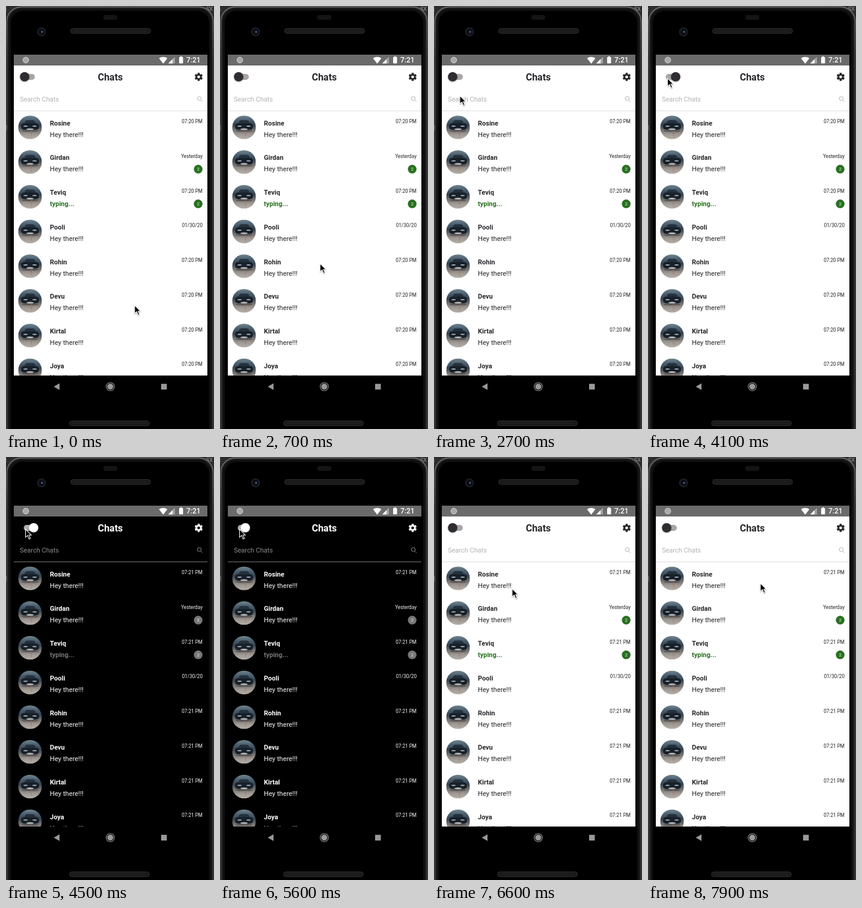
Write an HTML page with a canvas that moves like this. It is 346 by 704 pixels and loops after 8 s.

```html
<!DOCTYPE html>
<html lang="en">
<head>
<meta charset="utf-8">
<title>Chats</title>
<style>
  html, body { margin: 0; width: 100%; height: 100%; overflow: hidden; background: #000; }
  canvas { display: block; width: 346px; height: 704px; }
</style>
</head>
<body>
<canvas id="stage" width="346" height="704"></canvas>
<script>
const ctx = document.getElementById('stage').getContext('2d');
const WIDTH = 346, HEIGHT = 704, LOOP = 8000, STEP = 100;
const SCREEN = { x: 13, y: 81, w: 322, h: 534 };
const MID = 173.5, ROW = 57.75;
const DARK_FROM = 4500, DARK_TO = 6600;

const LIGHT = { bg: '#fff', text: '#242426', strong: '#29262b', hint: '#b2b2b2', line: '#dedede',
                accent: '#28701f', knob: '#302d32', track: '#aaa6a8' };
const DARK = { bg: '#000', text: '#f4f4f4', strong: '#fff', hint: '#8c8c8c', line: '#777',
               accent: '#777', knob: '#fff', track: '#b4aeae' };

const CHATS = [
  { name: 'Rosine' },
  { name: 'Girdan', when: 'Yesterday', unread: 2 },
  { name: 'Teviq', typing: true, unread: 2 },
  { name: 'Pooli', when: '01/30/20' },
  { name: 'Rohin' },
  { name: 'Devu' },
  { name: 'Kirtal' },
  { name: 'Joya' }
];

const clamp = v => Math.min(1, Math.max(0, v));
const smooth = v => v * v * (3 - 2 * v);
const mix = (a, b, p) => a + (b - a) * p;
const progress = (t, from, to) => clamp((t - from) / (to - from));

// Each glide pulls the pointer from wherever it is to a new place.
function pointerAt(t) {
  const pos = { x: 213, y: 497 };
  const glide = (from, to, x, y, ease = p => p) => {
    const p = ease(progress(t, from, to));
    pos.x = mix(pos.x, x, p);
    pos.y = mix(pos.y, y, p);
  };
  glide(0, 1400, 118, 358);
  glide(1400, 3400, 31.5, 119, p => 1 - (1 - p) ** 2);
  glide(5800, 6600, 129, 218, p => 1 - (1 - p) ** 1.4);
  glide(6600, 7900, 186, 209, smooth);
  return pos;
}

const switchAt = t => smooth(progress(t, 3800, 4100)) - smooth(progress(t, 5500, 5800));

function paint(fill, stroke, width = 1) {
  if (fill) { ctx.fillStyle = fill; ctx.fill(); }
  if (stroke) { ctx.strokeStyle = stroke; ctx.lineWidth = width; ctx.stroke(); }
}

function disc(x, y, r, fill, stroke, width) {
  ctx.beginPath();
  ctx.arc(x, y, r, 0, Math.PI * 2);
  paint(fill, stroke, width);
}

function oval(x, y, rx, ry, fill) {
  ctx.beginPath();
  ctx.ellipse(x, y, rx, ry, 0, 0, Math.PI * 2);
  paint(fill);
}

function rect(x, y, w, h, fill) {
  ctx.fillStyle = fill;
  ctx.fillRect(x, y, w, h);
}

function pill(x, y, w, h, r, fill, stroke, width) {
  ctx.beginPath();
  ctx.roundRect(x, y, w, h, r);
  paint(fill, stroke, width);
}

function triangle(x1, y1, x2, y2, x3, y3, fill) {
  ctx.beginPath();
  ctx.moveTo(x1, y1);
  ctx.lineTo(x2, y2);
  ctx.lineTo(x3, y3);
  paint(fill);
}

function text(str, x, y, size, color, weight = 400, align = 'left') {
  ctx.font = `${weight} ${size}px Roboto, sans-serif`;
  ctx.textAlign = align;
  ctx.fillStyle = color;
  ctx.fillText(str, x, y);
}

// Evenly spaced vertical gradient
function fade(top, bottom, ...colors) {
  const g = ctx.createLinearGradient(0, top, 0, bottom);
  colors.forEach((color, i) => g.addColorStop(i / (colors.length - 1), color));
  return g;
}

function drawPhone() {
  rect(0, 0, WIDTH, HEIGHT, '#2c2c2c');
  text('x', -3, 8, 9, '#999');
  text('SX', 333, 8, 9, '#999');
  const shell = (inset, radius, fill, stroke, width) =>
    pill(inset, inset, WIDTH - 2 * inset, HEIGHT + 40, radius, fill, stroke, width);
  shell(1.5, 24, '#1a1a1a', fade(0, 90, '#686868', '#3c3c3c'), 2);
  shell(4, 22, '#101010', '#242424', 1);
  shell(8, 20, '#000');
  rect(0, 198, 2, 9, '#555');
  pill(MID - 11.5, 15, 23, 8, 3, '#141416');
  for (const [x, y] of [[MID, 37.5], [MID - 2, 690.5]]) {
    pill(x - 66, y, 133, 8, 4, '#191919', '#303030');
    rect(x - 61, y + 3.5, 123, 1, '#252525');
  }
  disc(59, 43, 7.5, '#1a1c20');
  disc(59, 43, 5, '#0a0d14');
  disc(60, 43, 1.5, '#55729c');
}

function drawStatusBar() {
  rect(SCREEN.x, SCREEN.y, SCREEN.w, 18, '#6b6b6b');
  disc(33, 90, 4.8, '#a9a9a9', '#d8d8d8');
  ctx.beginPath();
  ctx.moveTo(261.5, 96);
  ctx.arc(261.5, 96, 11.3, -Math.PI * .71, -Math.PI * .29);
  paint('#fff');
  triangle(270, 95.5, 281, 95.5, 281, 84.5, '#a5a5a5');
  triangle(270, 95.5, 277, 95.5, 277, 88.5, '#fff');
  pill(288, 85, 6.5, 10.5, 1, '#fff');
  rect(289.7, 83.8, 3, 2, '#fff');
  text('7:21', 300, 94.3, 12, '#fff', 500);
}

function drawNav(y, color) {
  triangle(79.5, y, 89, y - 5.5, 89, y + 5.5, color);
  disc(MID, y, 5, color);
  disc(MID, y, 6.8, null, color, 1.1);
  rect(258, y - 4.7, 9.5, 9.5, color);
}

function drawGear(x, y, color, hole) {
  const teeth = 6;
  ctx.save();
  ctx.translate(x, y);
  for (let i = 0; i < teeth; i++) {
    ctx.rotate(Math.PI * 2 / teeth);
    rect(-1.8, -6.7, 3.6, 3, color);
  }
  disc(0, 0, 5.1, color);
  disc(0, 0, 2.3, hole);
  ctx.restore();
}

function drawHeader(theme, on) {
  pill(29.5, 113, 18.5, 10, 5, theme.track);
  ctx.save();
  castShadow();
  disc(mix(31, 46, on), 117.8, 7.8, theme.knob);
  ctx.restore();
  text('Chats', MID, 124, 16, theme.strong, 700, 'center');
  drawGear(320.5, 118, theme.strong, theme.bg);
  text('Search Chats', 23, 159, 11, theme.hint);
  disc(321.5, 154, 3.3, null, theme.hint);
  ctx.beginPath();
  ctx.moveTo(324, 156.5);
  ctx.lineTo(327, 159.5);
  paint(null, theme.hint);
  rect(SCREEN.x, 174, SCREEN.w, 1, theme.line);
}

function castShadow() {
  ctx.shadowColor = 'rgba(0,0,0,.35)';
  ctx.shadowBlur = 2;
  ctx.shadowOffsetY = 1;
}

// A car at the end of a wet road
function drawAvatar(x, y) {
  const r = 19.7;
  ctx.save();
  ctx.translate(x, y);
  disc(0, 0, r);
  ctx.clip();
  rect(-r, -r, 2 * r, 2 * r, fade(-r, r, '#71858d', '#4b6070', '#364350', '#716f6e', '#a09a94', '#b5afa8'));
  pill(-9, -12, 18, 12, 5, '#25313e');
  pill(-15, -7, 30, 11, 5, '#182029');
  for (const side of [-1, 1]) oval(side * 7.5, -2, 3.5, .9, '#a9b5be');
  oval(0, 3, 6, 1.4, '#b9b9b9');
  oval(0, 6, 14, 1.6, 'rgba(40,42,46,.45)');
  rect(1.5, 6, 1.8, 12, fade(6, 18, 'rgba(205,90,80,.8)', 'rgba(205,90,80,.1)'));
  ctx.restore();
}

function drawChat(chat, y, theme, clock) {
  drawAvatar(40, y);
  text(chat.name, 73, y - 3.5, 11, theme.strong, 700);
  if (chat.typing) text('typing...', 73, y + 15.5, 11, theme.accent, 700);
  else text('Hey there!!!', 73, y + 15.5, 11.2, theme.text);
  text(chat.when || clock, 327, y - 7, 8.2, theme.text, 400, 'right');
  if (chat.unread) {
    disc(319.7, y + 11.8, 7.2, theme.accent);
    text(chat.unread, 319.7, y + 14.6, 8, '#e4e8e2', 400, 'center');
  }
}

function drawPointer({ x, y }) {
  const arrow = new Path2D('M1 2V13L4 10.3 6.7 16.4 8 15.8 5.4 10H9Z');
  ctx.save();
  ctx.translate(x + .5, y + .4);
  castShadow();
  ctx.strokeStyle = '#fff';
  ctx.lineWidth = 2;
  ctx.stroke(arrow);
  ctx.shadowColor = 'transparent';
  ctx.fillStyle = '#000';
  ctx.fill(arrow);
  ctx.restore();
}

function draw(t) {
  const theme = t >= DARK_FROM && t < DARK_TO ? DARK : LIGHT;
  const clock = t < DARK_FROM ? '07:20 PM' : '07:21 PM';
  const { x, y, w, h } = SCREEN;
  drawPhone();
  ctx.save();
  ctx.beginPath();
  ctx.rect(x, y, w, h);
  ctx.clip();
  rect(x, y, w, h, theme.bg);
  drawStatusBar();
  drawHeader(theme, switchAt(t));
  CHATS.forEach((chat, i) => drawChat(chat, 202 + i * ROW, theme, clock));
  ctx.restore();
  drawNav(633.5, '#999');
  drawPointer(pointerAt(t));
}

function tick() {
  const t = performance.now() % LOOP;
  draw(Math.floor(t / STEP) * STEP);
  requestAnimationFrame(tick);
}
tick();
</script>
</body>
</html>
```
